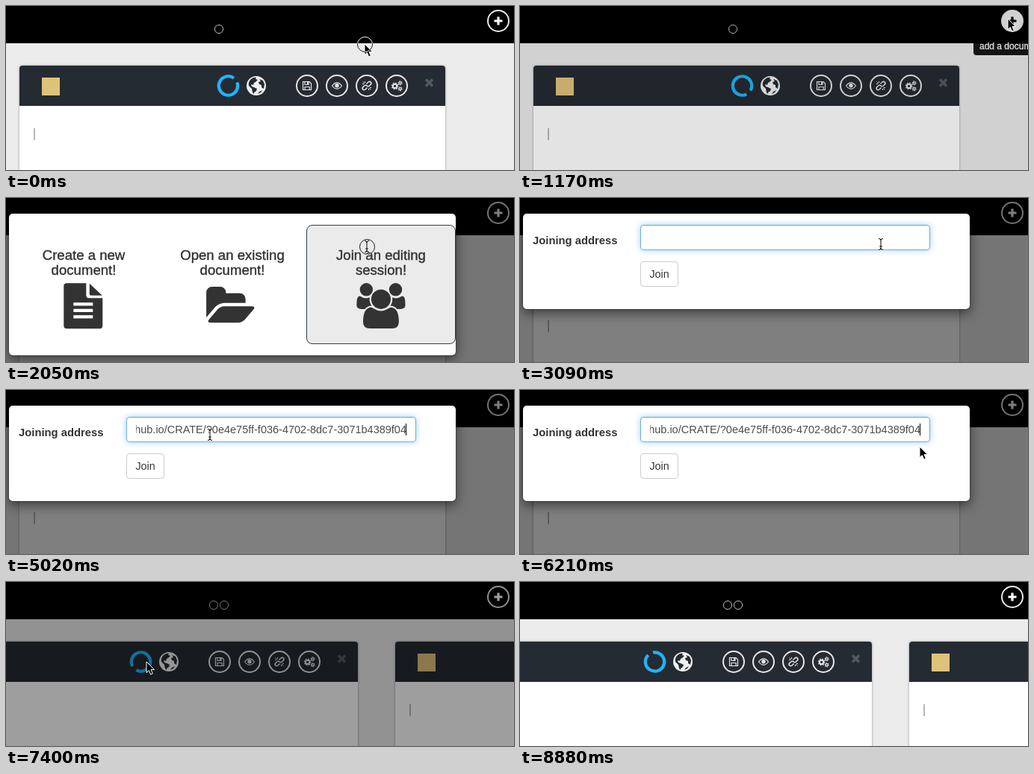
These frames come from a looping animation (680x220 px, 8.98 s). An HTML page:

```html
<!DOCTYPE html>
<html lang="en">
<head>
<meta charset="utf-8">
<title>Joining an editing session</title>
<style>
  html, body { margin: 0; width: 100%; height: 100%; overflow: hidden; }
  #stage { position: relative; width: 680px; height: 220px; overflow: hidden; isolation: isolate;
    background: #ebebeb; color: #333; font-family: "Liberation Sans", Arial, sans-serif; }
  #stage * { box-sizing: border-box; }
  .abs, #stage svg { position: absolute; left: 0; top: 0; }
  svg { overflow: visible; }
  #header { width: 680px; height: 50px; background: #000; }
  .panel { top: 80px; width: 570px; height: 160px; background: #fff; border-radius: 4px 4px 0 0;
    box-shadow: 0 0 3px rgba(0,0,0,.4); }
  .bar { width: 570px; height: 54px; background: #252b33; border-radius: 4px 4px 0 0; }
  .docCaret { left: 19px; top: 84px; width: 2px; height: 16px; background: #b8b8b8; }
  #tip { left: 607px; top: 43px; padding: 3px 8px; border-radius: 4px; background: #000; color: #fff;
    font-size: 12px; line-height: 17px; white-space: nowrap; -webkit-text-stroke: .3px #fff; }
  #shade { width: 680px; height: 220px; background: #000; }
  .modal { left: 3px; top: 20px; width: 600px; background: #fff; background-clip: padding-box;
    border: 1px solid rgba(0,0,0,.2); border-radius: 6px; box-shadow: 0 5px 15px rgba(0,0,0,.5); }
  #menu { height: 192px; }
  #form { height: 130px; }
  .card { top: 15px; width: 200px; height: 160px; padding-top: 30px; border: 1px solid transparent;
    border-radius: 8px; text-align: center; font-size: 18.6px; line-height: 19.8px;
    -webkit-text-stroke: .4px #333; }
  .card.on { background: #ebebeb; border-color: #2f3d4c; }
  #label { left: 13px; top: 26px; font: bold 14.8px/20px "Liberation Sans", Arial, sans-serif; }
  #field { left: 157px; top: 15px; width: 388px; height: 34px; border: 1px solid #ccc; border-radius: 4px;
    font-size: 14.5px; line-height: 32px; color: #4c4c4c; }
  #url { left: 12px; width: 362px; height: 32px; overflow: hidden; display: flex; white-space: nowrap; }
  #caret { top: 8px; width: 1px; height: 16px; background: #000; }
  #join { left: 157px; top: 64px; width: 51px; height: 34px; border: 1px solid #ccc; border-radius: 4px;
    text-align: center; font-size: 14.3px; line-height: 32px; }
</style>
</head>
<body>
<div id="stage"></div>
<script>
const LOOP = 8980;
const ADDRESS = "http://dusk-oven.github.io/CRATE/?0e4e75ff-f036-4702-8dc7-3071b4389f04";
const LIGHT = "#e8e8e8";

const SHORT = [0, 3, 7, 10, 13, 19, 25, 30, 36, 45, 51, 54, 56];
const ticks = [0];
for (let i = 0; i < 59; i++) ticks.push(ticks[i] + (SHORT.includes(i) ? 140 : 150));
ticks.push(8880);

const svg = body => `<svg width="680" height="220" fill="none">${body}</svg>`;
const at = (x, y, body, scale = 1) => `<g transform="translate(${x} ${y}) scale(${scale})">${body}</g>`;
const ring = (r, extra = "") => `<circle r="${r}" ${extra}/>`;
const gear = (x, y, r, w, teeth) => {
  const d = 2 * Math.PI * (r + w * .8) / (teeth * 2);
  return at(x, y, ring(r, `stroke-width="${w}"`) +
    ring(r + w * .8, `stroke-width="1.2" stroke-dasharray="${d}"`));
};

const icons = {
  save: `<path d="M-5.5 -5.5H3L5.5 -3V5.5H-5.5Z M-3 -5.5V-1.5H2V-5.5 M-3 5.5V1.5H3.2V5.5" stroke-width="1.2"/>
    <path d="M0 -5h1.6v3H0z" fill="${LIGHT}" stroke="none"/>`,
  eye: `<path d="M-6.5 0Q0 -8.4 6.5 0Q0 8.4 -6.5 0Z" stroke-width="1.2"/>
    <circle cy="-.3" r="2.7" fill="${LIGHT}" stroke="none"/>`,
  unlink: `<path d="M-.5 -2.5L2 -5Q4 -6.4 5.4 -4.8T5 -1.6L3.4 0Q1.6 1.4 0 0
    M.5 2.5L-2 5Q-4 6.4 -5.4 4.8T-5 1.6L-3.4 0Q-1.6 -1.4 0 0" stroke-width="1.5"/>
    <path d="M-2.5 -6V-3.8M-6 -2.5H-3.8M-5.4 -5.4L-3.4 -3.4M2.5 6V3.8M6 2.5H3.8M5.4 5.4L3.4 3.4"/>`,
  cogs: gear(-2.4, .4, 2.7, 2, 8) + gear(4.6, -3.6, 1.5, 1.2, 6) + gear(4.6, 4.2, 1.5, 1.2, 6),
};

const globe = `<circle r="13" fill="#f0f0f0"/>
  <path fill="#252b33" d="M-8 -8Q-4 -12 0 -11L-1 -9L2 -8L-1 -5L-3 -4L-4 -1L-7 -2L-6 1L-3 2L1 4L0 7L-3 9L-3 11
    L-5 9L-6 4L-10 0Q-11 -4 -8 -8Z M4 -9L9 -7L11 -2L10 4L7 2L7 -1L4 -2L3 -5L6 -6Z M4 8L8 6L6 9L2 11Z"/>`;

const panel = (cls, left) => `<div class="abs panel ${cls}" style="left:${left}px">
  <div class="abs bar"></div>${svg(
    `<rect x="30" y="16" width="24" height="24" fill="#dfc27a"/>` +
    at(279.5, 27, ring(12.7, `class="spin" stroke="#1fb4fa" stroke-width="4.2" stroke-dasharray="72 7.8"`)) +
    at(317, 27, globe) +
    Object.values(icons).map((icon, i) => at(385 + 40 * i, 27,
      `<g stroke="${LIGHT}">${ring(14, 'stroke-width="2"')}${icon}</g>`)).join("") +
    `<path d="M544 18.5l9 9m0 -9l-9 9" stroke="#555a61" stroke-width="3.4"/>`)}
  <div class="abs docCaret"></div></div>`;

const card = (i, a, b) =>
  `<div class="abs card" id="card${i}" style="left:${i * 199}px">${a}<br>${b}</div>`;

const fileArt = `<path d="M4 0H30V16Q30 20 34 20H52V57Q52 61 48 61H4Q0 61 0 57V4Q0 0 4 0Z
    M34.5 .5L51.5 16.5H37Q34.5 16.5 34.5 14Z"/>
  <path d="M13 28H39M13 36.5H39M13 45H39" stroke="#fff" stroke-width="4.2"/>`;

const folderArt = `<path d="M1815 952q0 31 -31 66l-336 396q-43 51 -120 87t-144 35h-1088q-34 0 -60 -13t-27 -43
    q0 -31 31 -66l336 -396q43 -51 120 -87t144 -35h1088q34 0 60 13t27 43z
    M1472 608v160h-832q-94 0 -197 48t-164 119l-337 396l-6 -7v-972q0 -92 66 -158t158 -66h320q92 0 158 66t66 158
    v32h544q92 0 158 66t66 158z"/>`;

const sideUser = `<circle cx="384" r="256"/>
  <path d="M593 640Q431 645 328 768H194Q0 768 0 609Q0 256 124 256Q130 256 168 277Q270 341 384 341
    Q451 341 517 318Q480 490 593 640Z"/>`;
const usersArt = `${sideUser}<g transform="translate(1920) scale(-1 1)">${sideUser}</g>
  <circle cx="960" cy="384" r="384"/>
  <path d="M256 1277Q256 704 587 704Q600 704 680 756Q815 843 960 843T1240 756Q1320 704 1333 704
    Q1664 704 1664 1277Q1664 1536 1397 1536H523Q256 1536 256 1277Z"/>`;

// Placed in stage coordinates, then moved into the dialog.
const menuArt = `<g transform="translate(-4 -21)" fill="#333">
  ${at(77.3, 114.3, fileArt)}${at(270.3, 114.6, folderArt, .0342)}${at(469.3, 122.8, usersArt, .034)}</g>`;

const beamPath = "M-3 -7.5Q0 -7.5 0 -5.5Q0 -7.5 3 -7.5M0 -6V6M-3 7.5Q0 7.5 0 5.5Q0 7.5 3 7.5M-1.8 3H1.8";

document.getElementById("stage").innerHTML = `
  <div class="abs" id="header"></div>
  ${svg(`<g stroke="#bdbdbd"><circle id="dot1" cy="31" r="5.6"/><circle id="dot2" cx="292" cy="31" r="5.6"/></g>` +
    at(659, 20, ring(14, `id="addRing" stroke="${LIGHT}" stroke-width="2"`) +
      `<path id="plus" d="M0 -5.5V5.5M-5.5 0H5.5" stroke-width="3.2"/>`))}
  ${panel("first", 18)}${panel("second", 521)}
  <div class="abs" id="tip">add a document</div>
  <div class="abs" id="shade"></div>
  <div class="abs modal" id="menu">
    ${card(0, "Create a new", "document!")}${card(1, "Open an existing", "document!")}
    ${card(2, "Join an editing", "session!")}${svg(menuArt)}
  </div>
  <div class="abs modal" id="form">
    <div class="abs" id="label">Joining address</div>
    <div class="abs" id="field"><div class="abs" id="url"><span id="address"></span></div>
      <div class="abs" id="caret"></div></div>
    <div class="abs" id="join">Join</div>
  </div>
  ${svg(`<g id="cursor">
    <path id="arrow" d="M0 0V14.6L3.3 11.5L5.7 17L8.3 15.9L6 10.6H10.5Z" fill="#000" stroke="#fff"/>
    <g id="beam"><path d="${beamPath}" stroke="#fff" stroke-width="2.6" opacity=".6"/>
      <path d="${beamPath}" stroke="#000"/></g>
    <path id="hand" d="M-1 1.5Q-1 0 .7 0T2.5 1.8V6Q4.8 5 5.3 6.6Q7.4 5.8 8 7.5Q10.4 6.9 10.4 9.5
      Q10.4 13 8.6 14.5V16.8H1.5V15L-3 9.5Q-3.4 7.6 -1.7 7.7L0 9Z M3.3 11V14.3M5.4 11V14.3M7.4 11V14.3"
      fill="#fff" stroke="#000" stroke-width="1.1"/></g>`)}
  <svg width="680" height="220" fill="none" style="mix-blend-mode:difference"><circle id="press" r="10" stroke="#fff"/></svg>`;

const $ = id => document.getElementById(id);
const clamp = v => Math.min(1, Math.max(0, v));
const ramp = (t, from, length) => clamp((t - from) / length);
const within = (t, a, b) => t >= a && t < b;
const show = (el, on) => { el.style.display = on ? "" : "none"; };
const mix = (a, b, k) => `rgb(${a.map((v, i) => Math.round(v + (b[i] - v) * k))})`;

// time, x, y, pointer from then on
const path = [
  [0, 480, 51, "arrow"], [140, 486, 50], [440, 560, 36], [880, 651, 19], [1030, 653, 17], [1170, 653, 17],
  [1320, 638, 25], [1610, 560, 50], [1910, 489, 64], [2050, 483, 65, "beam"], [2650, 483, 65], [2800, 483, 62],
  [3980, 483, 62], [4130, 468, 62], [4280, 446, 62], [4430, 446, 62], [5020, 273, 60], [5170, 264, 60],
  [5320, 273, 60], [5610, 408, 59], [5760, 490, 57], [5910, 565, 50, "arrow"], [6060, 565, 50],
  [6210, 535, 76], [6510, 360, 104], [6800, 198, 112, "hand"], [6950, 188, 110], [7100, 188, 110],
  [7250, 188, 107, "arrow"], [7690, 188, 107], [8130, 400, 135], [8420, 580, 175], [8570, 638, 201], [8720, 650, 240],
];

function pointer(t) {
  let i = path.length - 1;
  while (path[i][0] > t) i--;
  const a = path[i], b = path[i + 1] || a;
  const k = b === a ? 0 : (t - a[0]) / (b[0] - a[0]);
  const kind = path.slice(0, i + 1).reverse().find(p => p[3])[3];
  return { x: a[1] + (b[1] - a[1]) * k, y: a[2] + (b[2] - a[2]) * k, kind };
}

function drawPage(t) {
  const joined = t >= 7250;
  document.querySelector(".first").style.left = (joined ? -99 : 18) + "px";
  show(document.querySelector(".second"), joined);
  show($("dot2"), joined);
  $("dot1").setAttribute("cx", joined ? 278 : 285);
  for (const s of document.querySelectorAll(".spin"))
    s.setAttribute("transform", `rotate(${-21 + t * 360 / 5000})`);
  const hover = within(t, 880, 1290);
  $("addRing").setAttribute("fill", hover ? "#ebebeb" : "none");
  $("plus").setAttribute("stroke", hover ? "#000" : "#fff");
  $("tip").style.opacity = .9 * ramp(t, 880, 150) * (1 - ramp(t, 1290, 150));
  $("shade").style.opacity = .5 * (ramp(t, 1137, 150) - ramp(t, 7364, 150));
}

function drawMenu(t, p) {
  show($("menu"), within(t, 1287, 2200));
  $("menu").style.opacity = ramp(t, 1287, 150);
  const slide = Math.pow(1 - ramp(t, 1287, 300), 2);
  $("menu").style.transform = slide ? `translateY(${-48 * slide}px)` : "none";
  $("card2").classList.toggle("on", t > 1400 && p.x < 601 && p.y > 36);
}

function drawForm(t) {
  show($("form"), within(t, 2200, 7250));
  const focus = ramp(t, 2610, 150) - ramp(t, 7000, 150);
  const pasted = t >= 3830, editing = within(t, 2610, 7000);
  $("field").style.borderColor = mix([204, 204, 204], [102, 175, 233], t > 7000 ? .8 : focus);
  $("field").style.boxShadow =
    `inset 0 1px 1px rgba(0,0,0,.075), 0 0 8px rgba(102,175,233,${.6 * focus * focus})`;
  $("address").textContent = pasted ? ADDRESS : "";
  $("url").style.justifyContent = editing ? "flex-end" : "flex-start";
  const blink = Math.floor((t - (pasted ? 3780 : 2540)) / 500) % 2 === 0;
  show($("caret"), editing && blink);
  $("caret").style.left = (pasted ? 373 : 12) + "px";
  const down = t >= 7000;
  const b = $("join").style;
  b.background = down ? "#d2d2d2" : t >= 6800 ? "#e6e6e6" : "#fff";
  b.borderColor = down ? "#6f94c8" : t >= 6800 ? "#adadad" : "#ccc";
  b.boxShadow = down ? "inset 0 3px 5px rgba(0,0,0,.125), 0 0 3px 1px #4a94f5" : "none";
}

function draw(t) {
  const p = pointer(t);
  drawPage(t);
  drawMenu(t, p);
  drawForm(t);
  $("cursor").setAttribute("transform", `translate(${p.x} ${p.y})`);
  for (const kind of ["arrow", "beam", "hand"]) show($(kind), p.kind === kind);
  show($("press"), t < 140 || within(t, 2050, 2200));
  $("press").setAttribute("cx", p.x + .5);
  $("press").setAttribute("cy", p.y + .5);
}

const start = performance.now();
let last = -1;
function loop() {
  const now = (performance.now() - start) % LOOP;
  const tick = ticks.filter(t => t <= now).pop();
  if (tick !== last) draw(last = tick);
  requestAnimationFrame(loop);
}
loop();
</script>
</body>
</html>
```
